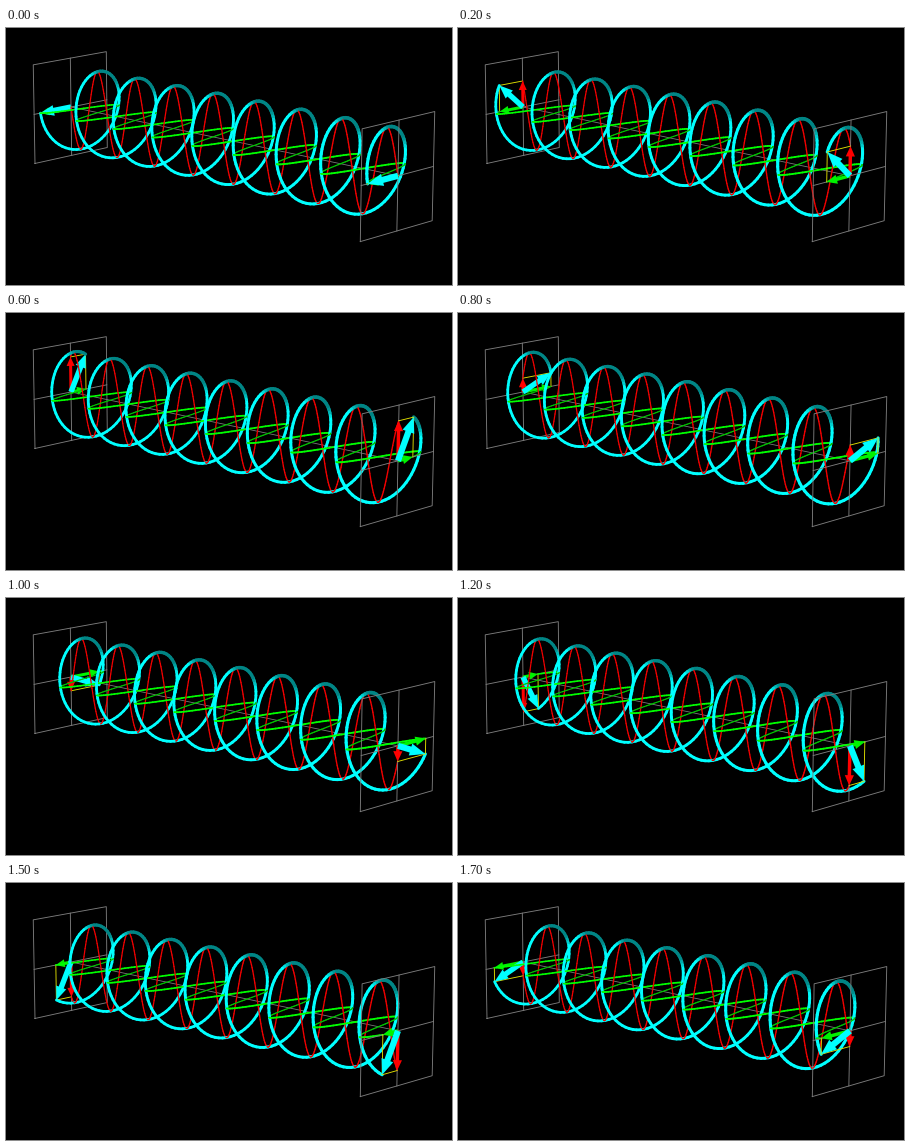
Recreate the animation shown at these times as a matplotlib script. Size 446 by 257 pixels, loop 1.8 s.

```python
import numpy as np
import matplotlib.pyplot as plt
from matplotlib.animation import FuncAnimation
from matplotlib.collections import LineCollection
from matplotlib.patches import Polygon

W, H, DPI = 446, 257, 64
PX = 72 / DPI            # one pixel in points
FRAMES, INTERVAL = 18, 100
TURNS, RADIUS = 8, 0.83
STEPS = TURNS * 60

CYAN, RED, GREEN = (0, 1, 1), (1, 0, 0), (0, 0.95, 0)
GREY, YELLOW = "#7c7c7c", "#e0e000"


def depth(z, u, v):
    return 1 - 0.13 * z + 0.015 * u - 0.005 * v


def project(z, u, v):
    """Map axis position z (0..1) and panel coordinates u, v to pixels."""
    w = depth(z, u, v)
    x = (65 + 276 * z + 37.3 * u - v) / w
    y = (79 + 49.6 * z - 6.1 * u - 49 * v) / w
    return np.stack([x, y], axis=-1)


fig = plt.figure(figsize=(W / DPI, H / DPI), dpi=DPI, facecolor="black")
ax = fig.add_axes([0, 0, 1, 1])
ax.set_xlim(0, W)
ax.set_ylim(H, 0)
ax.axis("off")


def line(points, color, width, zorder):
    pts = np.array([project(*p) for p in points])
    return ax.plot(pts[:, 0], pts[:, 1], color=color, lw=width * PX,
                   zorder=zorder)[0]


def panel(z, zorder):
    corners = [(-1, -1), (-1, 1), (1, 1), (1, -1), (-1, -1)]
    for path in (corners, [(-1, 0), (1, 0)], [(0, -1), (0, 1)]):
        line([(z, u, v) for u, v in path], GREY, 0.9, zorder)


def arrow_shape(tail, tip, shaft, head, length):
    d = tip - tail
    size = np.hypot(*d)
    if size < 1:
        return np.array([tail] * 7)
    d = d / size
    n = np.array([-d[1], d[0]])
    neck = tip - d * min(length, size)
    a, b = n * shaft / 2, n * head / 2
    return np.array([tail + a, neck + a, neck + b, tip,
                     neck - b, neck - a, tail - a])


class Vectors:
    """Rotating field vector with its two components at one end."""

    def __init__(self, z, zorder):
        self.z = z
        self.scale = 1 / depth(z, 0, 0)
        self.box = line([(z, 0, 0)] * 3, YELLOW, 0.9, zorder)
        self.arrows = [Polygon(np.zeros((7, 2)), fc=c, ec="none", zorder=zorder + i)
                       for i, c in ((0.1, GREEN), (0.2, RED), (0.3, CYAN))]
        for patch in self.arrows:
            ax.add_patch(patch)

    def update(self, angle):
        u, v = RADIUS * np.cos(angle), RADIUS * np.sin(angle)
        tail, across, up, tip = (project(self.z, *p) for p in
                                 ((0, 0), (u, 0), (0, v), (u, v)))
        self.box.set_data(*np.array([across, tip, up]).T)
        thin, thick = (3, 8, 9), (5.4, 10.8, 13.5)
        for patch, end, dims in zip(self.arrows, (across, up, tip),
                                    (thin, thin, thick)):
            patch.set_xy(arrow_shape(tail, end, *(k * self.scale for k in dims)))


panel(0, 1)
line([(0, 0, 0), (1, 0, 0)], GREY, 0.8, 2)
ends = [Vectors(0, 3), Vectors(1, 6)]
waves = LineCollection([], zorder=4, capstyle="round")
ax.add_collection(waves, autolim=False)
panel(1, 5)

z = np.linspace(0, 1, STEPS + 1)
zero = np.zeros_like(z)


def rgb(r, g, b):
    return np.stack(np.broadcast_arrays(r, g, b, zero[1:])[:3], axis=-1)


def update(k):
    start = np.pi - 2 * np.pi * k / FRAMES
    angle = start + 2 * np.pi * TURNS * z
    mid = (angle[1:] + angle[:-1]) / 2
    u, v = RADIUS * np.cos(angle), RADIUS * np.sin(angle)

    # the upper side of the helix lies in shade
    shade = np.clip((np.cos(mid - np.radians(66)) - 0.72) / 0.2, 0, 1)
    tint = 1 - 0.48 * shade
    back = np.sin(mid) > 0
    curves = [
        (u, v, rgb(0, tint, tint), 2.7 + 0.5 * shade),
        (zero, v, rgb(0.95, 0, 0), np.full(STEPS, 1.2)),
        (u, zero, rgb(0, np.where(back, 0.78, 1), 0), np.where(back, 1.1, 1.6)),
    ]
    segs, cols, widths, depths = [], [], [], []
    for cu, cv, color, width in curves:
        p = project(z, cu, cv)
        w = depth(z, cu, cv)[1:]
        segs.append(np.stack([p[:-1], p[1:]], axis=1))
        cols.append(color)
        widths.append(width / w * PX)
        depths.append(w)
    order = np.argsort(-np.concatenate(depths), kind="stable")
    waves.set_segments(np.concatenate(segs)[order])
    waves.set_color(np.concatenate(cols)[order])
    waves.set_linewidth(np.concatenate(widths)[order])

    for end in ends:
        end.update(start)
    return []


anim = FuncAnimation(fig, update, frames=FRAMES, interval=INTERVAL,
                     repeat=True, repeat_delay=0, blit=False)
plt.show()
```
